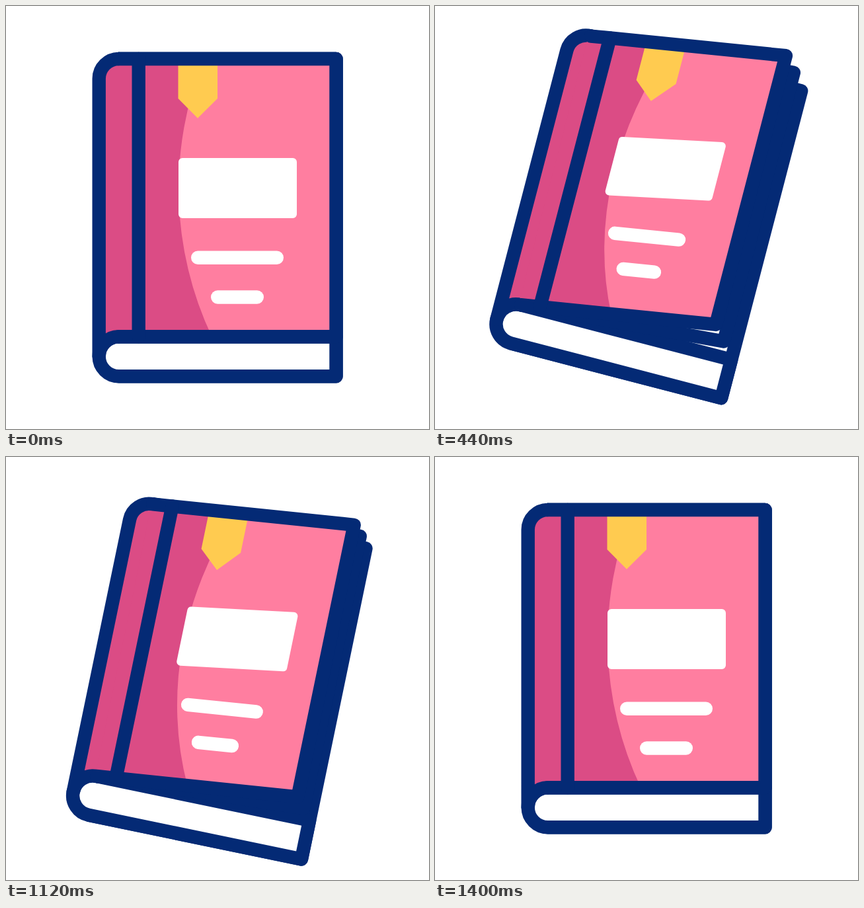
Write an HTML page without scripts that moves like this. It is 640 px wide and 640 px high and loops after 1480 ms.

```html
<!DOCTYPE html>
<html lang="en">
<head>
<meta charset="utf-8">
<title>Book</title>
<style>
/* how far the cover is open, 0 to 1 */
@property --p { syntax: "<number>"; inherits: true; initial-value: 0; }

html, body { margin: 0; width: 100%; height: 100%; overflow: hidden; background: #fff; }
svg { display: block; width: 100vw; height: 100vh; }

.ink { stroke: #042a75; stroke-width: 20.4; stroke-linejoin: round; stroke-linecap: round; }
.bare { fill: none; }
.white { fill: #fff; }
.pink { fill: #ff7ea0; }
.dark { fill: #db4c85; }
.gold { fill: #ffcb50; }
.rule { stroke: #fff; stroke-width: 20.4; stroke-linecap: round; }
path, line { vector-effect: non-scaling-stroke; }

.book {
  transform-origin: 320px 320px;
  animation: tilt 1480ms infinite, hop 1480ms infinite, open 1480ms infinite;
  animation-timing-function: cubic-bezier(.333, 0, .667, 1);
}

/* everything on the cover hinges on the spine */
.sheet, .cover, .board { transform-origin: 170.5px 0; }
.sheet {
  transform: skewY(calc(var(--p) * (-5.4deg - var(--p) * .7deg)))
    scaleX(calc(1 - var(--p) * .0735));
}
.cover { transform: skewY(calc(var(--p) * (-10.5deg - var(--p) * 1.9deg))); }
.board { transform: scaleX(calc(1 - var(--p) * .147)); }
.shade { transform: translateX(calc(var(--p) * -7px)); }
.mark { transform: translateX(calc(var(--p) * -9px)); }
.bar { transform: translateX(calc(var(--p) * -2px)); }
.label {
  transform-origin: 255px 0;
  transform: translate(calc(var(--p) * -12px), calc(var(--p) * -1px))
    skewY(max(-2.8deg, calc(var(--p) * -5.5deg)))
    scaleX(calc(1 - var(--p) * .158));
}
.long {
  transform-origin: 242px 0;
  transform: translateY(calc(var(--p) * -5.4px)) scaleX(calc(1 - var(--p) * .263));
}
.short {
  transform-origin: 256.6px 0;
  transform: translateY(calc(var(--p) * -14.3px)) scaleX(calc(1 - var(--p) * .287));
}

@keyframes tilt {
  0%, 5.405% { rotate: 0deg; }
  32.432%, 67.568% { rotate: 15deg; }
  94.595%, 100% { rotate: 0deg; }
}
@keyframes hop {
  0%, 5.405% { translate: 0 0; }
  16.216% { translate: 0 41px; }
  32.432%, 67.568% { translate: 0 -8px; }
  83.784% { translate: 0 41px; }
  94.595%, 100% { translate: 0 0; }
}
/* the cover snaps a little before it swings shut */
@keyframes open {
  0%, 8.108% { --p: 0; }
  40.541%, 67.5% { --p: 1; }
  67.55% { --p: .865; animation-timing-function: cubic-bezier(.333, .333, .667, 1); }
  91.892%, 100% { --p: 0; }
}
</style>
</head>
<body>
<svg viewBox="0 0 640 640">
  <g class="book">
    <!-- back cover and page block -->
    <path class="ink white" d="M170.5 80H499.5V560.3H170.5"/>
    <path class="ink white" d="M499.5 500.3H170.7a30 30 0 0 0 0 60H499.5Z"/>

    <path class="ink white sheet" d="M170.5 80H499.5V500.3H170.5"/>

    <!-- spine -->
    <path class="dark" d="M180 80H170.7a30 30 0 0 0-30 30V530.3a30 30 0 0 1 30-30H180Z"/>
    <path class="ink bare" d="M170.7 80a30 30 0 0 0-30 30V530.3a30 30 0 0 1 30-30"/>

    <!-- front cover -->
    <g class="cover">
      <path class="pink board" d="M205 80H499.5V500.3H205Z"/>
      <path class="dark shade" d="M172 80H299.2A525 525 0 0 0 311.5 500.3H172Z"/>
      <path class="gold mark" d="M260.5 80H320V140L290 169.7L260.5 140Z"/>
      <path class="ink bare board" d="M170.5 80H499.5V500.3H170.5"/>
      <line class="ink bar" x1="200.7" y1="80" x2="200.7" y2="500"/>
      <path class="white label" d="M267 236H434V315H267Z" stroke="#fff" stroke-width="12" stroke-linejoin="round"/>
      <line class="rule long" x1="290.2" y1="380.7" x2="409.8" y2="380.7"/>
      <line class="rule short" x1="320.2" y1="440.5" x2="379.8" y2="440.5"/>
    </g>
  </g>
</svg>
</body>
</html>
```
